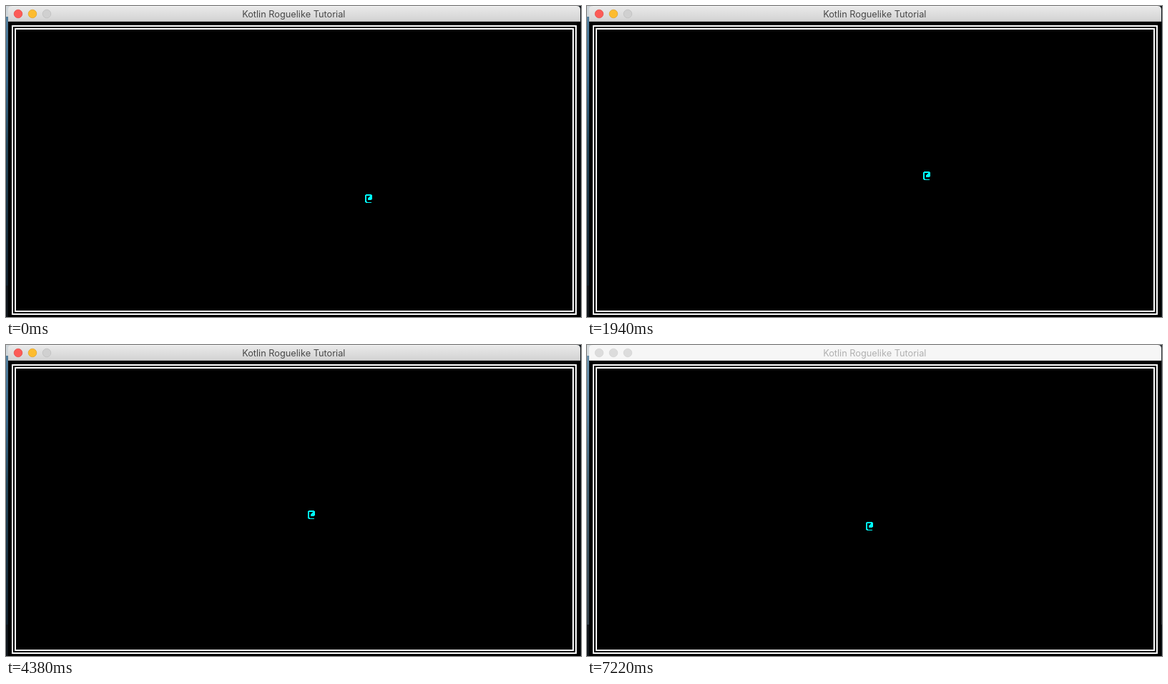
Recreate the animation shown at these times as an HTML page. Size 804x436 px, loop 7320 ms.

```html
<!DOCTYPE html>
<html lang="en">
<head>
<meta charset="utf-8">
<title>Kotlin Roguelike Tutorial</title>
<style>
  html, body { margin: 0; width: 100%; height: 100%; overflow: hidden; background: #000; }
  svg { display: block; width: 804px; height: 436px; }
  .title { font: 12.75px Inter, Roboto, sans-serif; text-anchor: middle; fill: #484848; }
  .lights circle { stroke-width: .7; }
  .inactive .title { fill: #b0b0b0; }
  .inactive .bar { fill: #f6f6f6; }
  .inactive .edge { fill: #d9d9d9; }
  .inactive .shine { fill: #fafafa; }
  .inactive .lights circle { fill: #dcdcdc; stroke: #d2d2d2; }
  .inactive .glow { opacity: .14; }
</style>
</head>
<body>
<svg id="stage" viewBox="0 0 804 436">
  <defs>
    <linearGradient id="metal" x1="0" y1="0" x2="0" y2="1">
      <stop offset="0" stop-color="#eaeaea"/>
      <stop offset="1" stop-color="#d2d2d2"/>
    </linearGradient>
    <linearGradient id="desk" x1="0" y1="0" x2="0" y2="1">
      <stop offset="0" stop-color="#55819f"/>
      <stop offset=".25" stop-color="#3a6a8d"/>
      <stop offset=".5" stop-color="#234559"/>
      <stop offset="1" stop-color="#12212d"/>
    </linearGradient>
  </defs>
  <rect width="804" height="436" fill="#10161c"/>
  <rect width="8" height="392" fill="url(#desk)"/>
  <rect width="8" height="15" fill="#cfd6da"/>
  <rect class="glow" width="804" height="392" fill="#fff" opacity="0"/>
  <rect x="3" y="21" width="800" height="415"/>
  <path class="bar" d="M3 22V5Q3 0 8 0H798Q803 0 803 5V22Z" fill="url(#metal)"/>
  <rect class="shine" x="8" width="790" height="1" fill="#f4f4f4"/>
  <rect class="edge" x="3" y="21" width="800" height="1" fill="#b4b4b4"/>
  <g class="lights">
    <circle cx="17" cy="11" r="5.8" fill="#fc5b57" stroke="#e2463f"/>
    <circle cx="37" cy="11" r="5.8" fill="#fdbc2f" stroke="#dfa023"/>
    <circle cx="57" cy="11" r="5.8" fill="#d0d0d0" stroke="#bcbcbc"/>
  </g>
  <text class="title" x="402.3" y="16">Kotlin Roguelike Tutorial</text>
  <g fill="none" stroke="#fff" stroke-width="2" shape-rendering="crispEdges">
    <rect x="9" y="28" width="788" height="404"/>
    <rect x="13" y="32" width="780" height="396"/>
  </g>
  <path id="hero" fill="#0ff" shape-rendering="crispEdges"
    d="M1 0H9V1H10V7H9V8H4V5H5V4H6V3H7V2H2V10H3V11H9V12H1V11H0V1H1Z"/>
</svg>
<script>
  const LOOP = 7320, BLUR = 7220, CELL = 16;
  const stage = document.getElementById("stage");
  const hero = document.getElementById("hero");

  // Roguelike movement keys: hjkl straight, yubn diagonal
  const moves = {
    h: [-1, 0], j: [0, 1], k: [0, -1], l: [1, 0],
    y: [-1, -1], u: [1, -1], b: [-1, 1], n: [1, 1]
  };

  // Bursts of key presses: start in ms, gap between presses, keys
  const bursts = [
    [300, 150, "hh"], [630, 300, "hhu"], [1410, 410, "ul"],
    [1940, 230, "hh"], [2410, 180, "nj"], [2890, 120, "yj"],
    [3190, 60, "hk"], [4030, 170, "yk"], [4380, 350, "j"],
    [4730, 101.4, "nkkhhjhj"]
  ];

  function position(time) {
    let col = 31, row = 15;
    for (const [start, gap, keys] of bursts) {
      const pressed = Math.max(0, Math.floor((time - start) / gap) + 1);
      for (const key of keys.slice(0, pressed)) {
        col += moves[key][0];
        row += moves[key][1];
      }
    }
    return [col, row];
  }

  function draw(time) {
    const [col, row] = position(time);
    hero.setAttribute("transform", `translate(${6 + col * CELL} ${24 + row * CELL})`);
    stage.classList.toggle("inactive", time >= BLUR);
  }

  const start = performance.now();
  function tick() {
    draw((performance.now() - start) % LOOP);
    requestAnimationFrame(tick);
  }
  tick();
</script>
</body>
</html>
```
